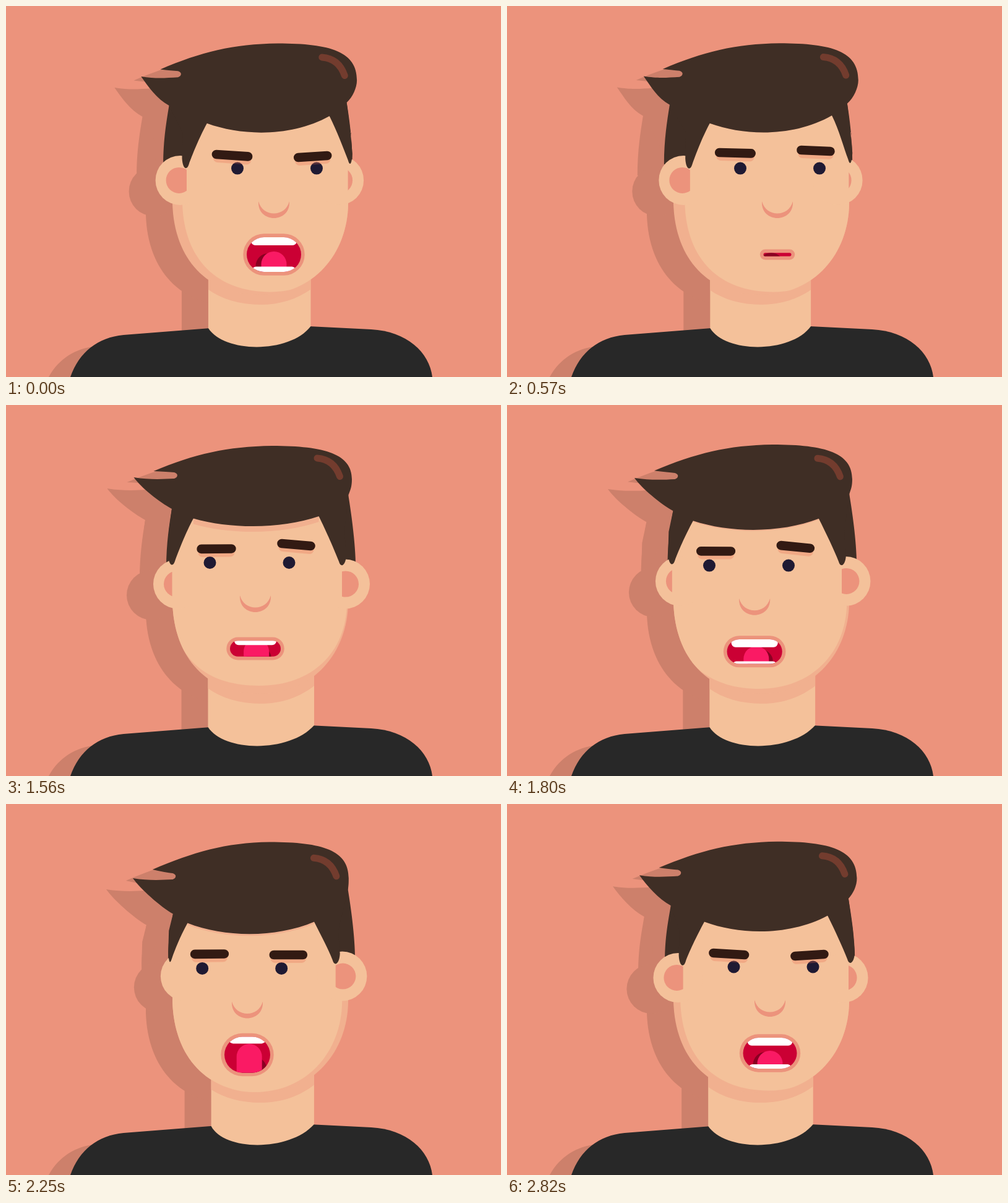
An HTML page with a canvas that plays this animation: 800x600 px, repeating every 2.85 s.

```html
<!DOCTYPE html>
<html lang="en">
<head>
<meta charset="utf-8">
<title>Talking head</title>
<style>
  html, body { margin: 0; width: 100%; height: 100%; overflow: hidden; background: #ec937c; }
  canvas { display: block; }
</style>
</head>
<body>
<canvas id="stage" width="800" height="600"></canvas>
<script>
const ctx = document.getElementById('stage').getContext('2d');
const LOOP = 2850, STEP = 30;
const C = {
  bg: '#ec937c', cast: '#cd806b', shirt: '#282828', skin: '#f4c19a', shade: '#f1b08f',
  hair: '#3f2e25', shine: '#733c2e', brow: '#321a13', browCast: 'rgba(232,110,80,.28)',
  eye: '#1f1a33', mouth: '#cb0034', tongue: '#fa1a64', tongueCast: '#8a0022'
};

// Pose values at the key times; everything else on the head follows from turn and nod.
const TIMES = [0, 570, 1110, 1560, 2010, 2250, 2820];
const TRACKS = {
  turn: [433, 437, 420, 403, 397.5, 390, 425],
  nod: [343, 343, 339, 335, 345, 346.5, 344],
  gaze: [14.5, 13.5, -1.5, 0, 0.5, 0.7, 15],
  browL: [241.7, 237.7, 235, 232.7, 240.7, 242.7, 242.5],
  browR: [243.5, 234, 228, 226, 235.5, 244, 244.5],
  tiltL: [1.7, 0.7, 0, -0.2, 0.2, -0.2, 1.5],
  tiltR: [-1.5, 1, 2, 2, 2.5, 0, -1.5],
  mouthW: [88, 45, 40, 82, 90, 74, 87],
  mouthH: [56, 5.5, 9, 25.5, 51, 58, 50],
  lowTeeth: [8.5, 0, 0, 0, 7.5, 0, 7],
  tongue: [397, 408, 403, 378, 400, 388, 399],
  castTop: [400, 399, 398.5, 390, 402, 409, 401],
  castX: [-9, -10, 0, 4, 8, 8, -7]
};

// Periodic cubic curve whose slopes are limited so that it never overshoots a key.
function curve(vals) {
  const n = vals.length, at = i => (i + n) % n;
  const h = vals.map((_, i) => (i < n - 1 ? TIMES[i + 1] : LOOP) - TIMES[i]);
  const d = vals.map((v, i) => (vals[at(i + 1)] - v) / h[i]);
  const m = vals.map((_, i) => {
    const p = at(i - 1);
    if (d[p] * d[i] <= 0) return 0;
    const s = (h[i] * d[p] + h[p] * d[i]) / (h[p] + h[i]);
    return Math.sign(s) * Math.min(Math.abs(s), 3 * Math.abs(d[p]), 3 * Math.abs(d[i]));
  });
  return t => {
    let i = n - 1;
    while (TIMES[i] > t) i--;
    const u = (t - TIMES[i]) / h[i], w = 1 - u, j = at(i + 1);
    return vals[i] * w * w * (1 + 2 * u) + vals[j] * u * u * (3 - 2 * u) +
      h[i] * u * w * (m[i] * w - m[j] * u);
  };
}
const curves = Object.entries(TRACKS).map(([k, v]) => [k, curve(v)]);

function path(draw) {
  const p = new Path2D();
  draw(p);
  return p;
}
function circle(x, y, r) {
  return path(p => p.arc(x, y, r, 0, 7));
}
function fill(p, color) {
  ctx.fillStyle = color;
  ctx.fill(p);
}
function clipped(p, draw) {
  ctx.save();
  ctx.clip(p);
  draw();
  ctx.restore();
}
function stroke(p, width, color) {
  ctx.strokeStyle = color;
  ctx.lineWidth = width;
  ctx.lineCap = 'round';
  ctx.stroke(p);
}

const shirt = path(p => {
  p.moveTo(104, 600);
  p.bezierCurveTo(118, 560, 148, 536, 190, 532);
  p.lineTo(330, 521);
  p.lineTo(490, 518);
  p.lineTo(590, 523);
  p.bezierCurveTo(648, 526, 684, 560, 689, 600);
  p.lineTo(689, 640);
  p.lineTo(104, 640);
});

function faceShape(dx, chin, dy = 0) {
  return path(p => {
    p.moveTo(269 + dx, 230);
    p.lineTo(285 + dx, 175);
    p.lineTo(535 + dx, 175);
    p.lineTo(553 + dx, 230);
    p.lineTo(553 + dx, 320 + dy);
    p.bezierCurveTo(552 + dx, 400 + dy, 497 + dx, chin + dy, 411 + dx, chin + dy);
    p.bezierCurveTo(325 + dx, chin + dy, 272 + dx, 410 + dy, 269 + dx, 320 + dy);
    p.closePath();
  });
}
const jaw = faceShape(0, 467), jawCast = faceShape(0, 467, 16);

// Positions of the head's parts.
function rig(s) {
  const a = s.turn - 403, b = s.nod - 335;
  const f = (base, ka, kb = 0, kq = 0) => base + ka * a + kb * b + kq * a * a;
  const edgeL = f(259, -.22, 0, .002), edgeR = f(565.2, 0, 0, -.006);
  return {
    a, b, edgeL, edgeR,
    tip: [f(206.5, .2, 0, .0065), f(117, -.13, .12)],
    top: [f(238.5, .2, 0, .0055), f(107, -.1, -.2)],
    notch: [f(277, .2), f(114, -.15, .1)],
    apex: [f(430, .3), f(66, -.06, -.45)],
    quiff: f(559, .36, 0, -.003),
    join: [f(553.3, 0, 0, -.003), f(146, .38, -.15)],
    base: [f(268, -.15), f(168, -.35, .45)],
    frL: [f(302.9, .73), f(183.4, 0, .8)],
    frR: [f(505.5, .575), f(180, -.24, .65)],
    frY: f(196, -.04, 1.2),
    burnL: [Math.max(f(269, .6, 0, .005), edgeL + 2), f(258.5, .15, -.1)],
    burnR: [Math.min(f(543, .7, 0, -.007), edgeR - 2), f(259, 0, 0, -.0045)],
    earL: f(278, -.6, 0, .024), earR: f(548, .15, 0, -.016), earY: f(289.5, 0, -.95),
    cutL: f(268.5, .6, 0, .006), cutR: f(543, .65, 0, -.011),
    neckL: f(326.5, -.27, 0, .0095), neckR: f(498, -.05, 0, -.0045),
    shine: [f(503, .38, 0, -.004), f(86, -.1)]
  };
}

function fringe(p, r, dy = 0) {
  const [xl, yl] = r.frL, [xr, yr] = r.frR, w = .3 * (xr - xl);
  const c = (r.frY - .125 * (yl + yr)) / .75 + dy;
  p.bezierCurveTo(xr - w, c, xl + w, c, xl, yl + dy);
}

function notchEdge(p, r) {
  const [tx, ty] = r.tip, [ex, ey] = r.notch;
  p.bezierCurveTo(tx + 25, ty + 4, ex - 25, ey + 6, ex - 5, ey + 5);
  p.bezierCurveTo(ex + 1, ey + 3, ex + 2, ey - 3, ex - 5, ey - 5);
  p.quadraticCurveTo(ex - 16, ey - 6, ...r.top);
}

function frontHair(r) {
  return path(p => {
    const [tx, ty] = r.top, [ax, ay] = r.apex, [jx, jy] = r.join, [bx, by] = r.base;
    const [lx, ly] = r.burnL, [rx, ry] = r.burnR;
    const outL = Math.max(lx - 7, r.edgeL), outR = Math.min(rx + 7, r.edgeR);
    p.moveTo(tx, ty);
    p.bezierCurveTo(tx + 66, ty - 28, ax - 72, ay + 1, ax, ay);
    p.bezierCurveTo(ax + 87, ay, r.quiff, ay + 14, r.quiff, 120);
    p.bezierCurveTo(r.quiff, 132, jx + .6 * (r.quiff - jx), jy - 9, jx, jy);
    p.lineTo(outR - 3, 205);
    p.lineTo(outR, ry - 16);
    p.bezierCurveTo(outR - 1, ry + 1, rx - 2, ry + 5, rx - 5, ry - 6);
    p.bezierCurveTo(rx - 12, ry - 24, r.frR[0] + 12, r.frR[1] + 24, ...r.frR);
    fringe(p, r);
    p.bezierCurveTo(r.frL[0] - 13, r.frL[1] + 24, lx + 9, ly - 20, lx + 4, ly - 6);
    p.bezierCurveTo(lx + 1, ly + 4, outL + 1, ly + 2, outL, ly - 16);
    p.lineTo(outL + 1, 205);
    p.lineTo(bx, by);
    p.bezierCurveTo(bx - 20, by - 11, r.tip[0] + 12, r.tip[1] + 17, ...r.tip);
    notchEdge(p, r);
  });
}

function sideHair(r) {
  const end = r.earY - 26;
  const side = (p, [x, y], dx, edge, inner, fr) => {
    p.moveTo(x, y);
    p.bezierCurveTo(x + dx, y + 25, edge, end - 40, edge, end);
    p.lineTo(inner, end);
    p.lineTo(inner, 205);
    p.lineTo(...fr);
    p.closePath();
  };
  return path(p => {
    side(p, r.base, -4, r.edgeL, r.burnL[0], r.frL);
    side(p, r.join, 4, r.edgeR, r.burnR[0], r.frR);
  });
}

function drawEar(x, y, innerX, from, to) {
  fill(circle(x, y, 40), C.skin);
  clipped(path(p => p.rect(from, y - 40, to - from, 80)), () => fill(circle(innerX, y, 21), C.bg));
}

function drawBrow(x, y, half, tilt) {
  const bar = (dx, dy) => path(p => {
    p.moveTo(x - half + dx, y - tilt + dy);
    p.lineTo(x + half - dx, y + tilt + dy);
  });
  stroke(bar(2, 6), 14, C.browCast);
  stroke(bar(0, 0), 14.6, C.brow);
}

function drawNose(x, y) {
  fill(path(p => {
    p.moveTo(x - 25, y - 27);
    p.bezierCurveTo(x - 27, y + 9, x + 27, y + 9, x + 25, y - 27);
    p.bezierCurveTo(x + 18, y - 1, x - 18, y - 1, x - 25, y - 27);
  }), C.bg);
}

function drawMouth(s) {
  const x = s.turn, y = s.nod + 59, w = s.mouthW, h = s.mouthH;
  const pill = (px, py, pw, ph, r) => path(p => p.roundRect(px, py, pw, ph, r));
  const box = grow => pill(x - w / 2 - grow, y - h / 2 - grow, w + 2 * grow, h + 2 * grow,
    Math.min(30, h / 2) + grow);
  fill(box(5.7), C.bg);
  fill(box(0), C.mouth);
  clipped(box(0), () => {
    const tx = x + Math.max(0, s.castX) * .4;
    fill(pill(tx - 20.5 + s.castX, s.castTop, 41, 90, 20.5), C.tongueCast);
    fill(pill(tx - 20.5, s.tongue, 41, 90, 20.5), C.tongue);
    const upper = Math.min(.42 * (h - 9), .147 * w), tw = w - 14;
    if (upper > 0) fill(pill(x - tw / 2, y - h / 2 - 10, tw, upper + 10, 7), '#fff');
    if (s.lowTeeth > 0) fill(pill(x - tw / 2 + 2, y + h / 2 - s.lowTeeth, tw - 4, 30, 6), '#fff');
  });
}

function draw(t) {
  const s = Object.fromEntries(curves.map(([k, f]) => [k, f(t)]));
  const r = rig(s), { a, b } = r;
  const hair = frontHair(r), sides = sideHair(r);
  const neck = path(p => {
    p.moveTo(r.neckL, 400);
    p.lineTo(r.neckL, 521);
    p.bezierCurveTo(353, 562, 459, 562, r.neckR, 518);
    p.lineTo(r.neckR, 400);
  });

  fill(path(p => p.rect(0, 0, 800, 600)), C.bg);
  ctx.save();
  ctx.translate(-43, 18);
  [shirt, neck, jaw, sides, hair, circle(r.earL, r.earY, 40), circle(r.earR, r.earY, 40)]
    .forEach(p => fill(p, C.cast));
  ctx.restore();

  fill(shirt, C.shirt);
  fill(neck, C.skin);
  clipped(neck, () => fill(jawCast, C.shade));

  fill(jaw, C.shade);
  clipped(jaw, () => fill(faceShape(.6 * a - 2, 454 + 1.05 * b), C.skin));
  fill(sides, C.hair);
  drawEar(r.earL, r.earY, r.earL - 2, 0, r.cutL);
  drawEar(r.earR, r.earY, r.earR + 1, r.cutR, 800);

  const drop = Math.max(0, 9 - 1.5 * b, 1.5 - .1 * a);
  fill(path(p => {
    p.moveTo(r.frR[0], r.frR[1] + drop);
    fringe(p, r, drop);
    p.lineTo(...r.frL);
    p.lineTo(...r.frR);
  }), C.shade);
  fill(hair, C.hair);

  const [hx, hy] = r.shine;
  stroke(path(p => {
    p.moveTo(hx, hy);
    p.quadraticCurveTo(hx + 27, hy + 2, hx + 36.5, hy + 29.5);
  }), 11, C.shine);

  const eyeY = 255 + .95 * b;
  fill(circle(329.5 + a + s.gaze, eyeY, 10), C.eye);
  fill(circle(457.5 + a + s.gaze, eyeY, 10), C.eye);
  drawBrow(340 + .85 * a, s.browL, 24.4 + .04 * a, s.tiltL);
  drawBrow(469 + .95 * a - .002 * a * a, s.browR, 23.5, s.tiltR);
  drawNose(s.turn, s.nod);
  drawMouth(s);
}

const start = performance.now();
function tick() {
  const t = Math.max(0, performance.now() - start) % LOOP;
  draw(Math.floor(t / STEP) * STEP);
  requestAnimationFrame(tick);
}
tick();
</script>
</body>
</html>
```
